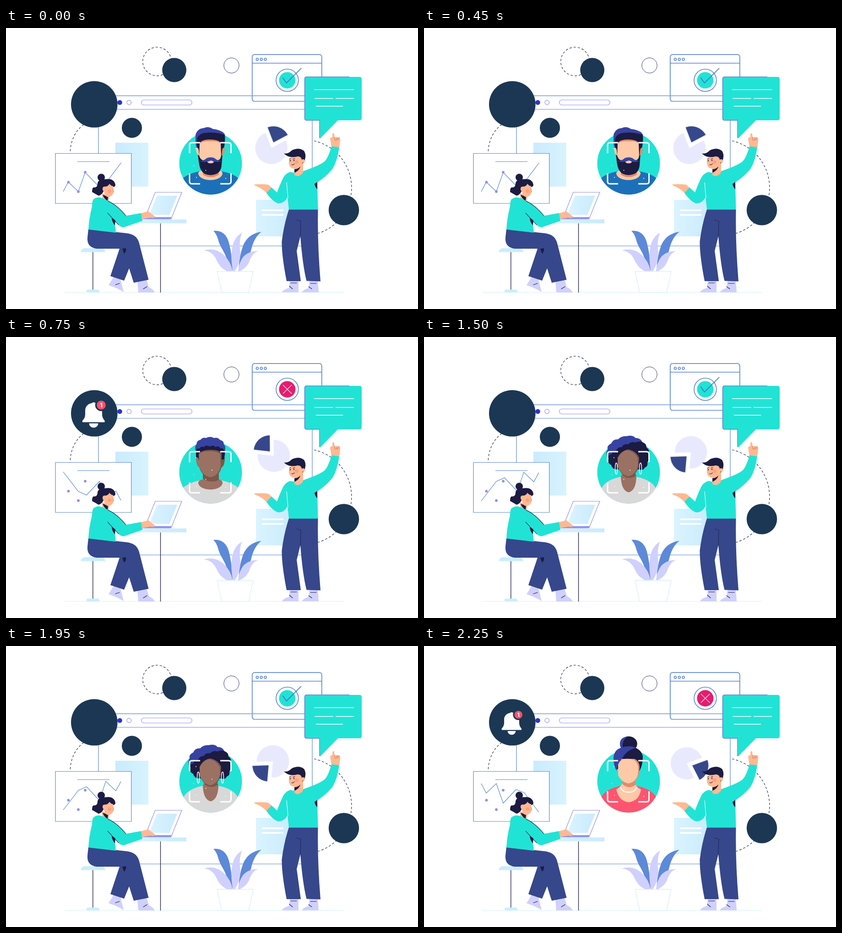
An HTML page that plays this animation: 900 by 615 pixels, repeating every 3 s.

```html
<!DOCTYPE html>
<html lang="en">
<head>
<meta charset="utf-8">
<title>Identity check</title>
<style>
html, body { margin: 0; width: 100%; height: 100%; overflow: hidden; background: #fff; }
svg { display: block; width: 900px; height: 615px; }
.line { fill: none; stroke: #5d87d8; stroke-width: 1.2; }
.dash { fill: none; stroke: #28305f; stroke-width: 1.2; stroke-dasharray: 5 4; }
.white { fill: none; stroke: #fff; }
.ink { fill: none; stroke: #1c1b42; stroke-width: 1.1; stroke-linecap: round; }
.navy { fill: #1c3754; }
.dark { fill: #1c1b42; }
.blue { fill: #36478b; }
.hair { fill: #3743a2; }
.teal { fill: #21e3d5; }
.skin { fill: #ffb992; }
.fair { fill: #fdc9a7; }
.brown { fill: #9b7163; }
.lilac { fill: #d0d0fe; }
.leaf { fill: #5d89d9; }

/* four scenes, 750 ms each, with hard cuts */
.scene { animation: scene 3s step-end infinite; }
.s1 { animation-delay: -2.25s; }
.s2 { animation-delay: -1.5s; }
.s3 { animation-delay: -.75s; }
.pass, .fail { animation: flip 1.5s step-end infinite; }
.fail { animation-delay: -.75s; }
.pie { animation: pie 3s step-end infinite; }
.bell { animation: bell 3s step-end infinite; }
@keyframes scene { 0% { visibility: visible; } 25%, 100% { visibility: hidden; } }
@keyframes flip { 0% { visibility: visible; } 50%, 100% { visibility: hidden; } }
@keyframes pie {
  0%, 100% { transform: translate(579.7px, 262.5px) rotate(-69.5deg); }
  25% { transform: translate(585px, 260px) rotate(-132deg); }
  50% { transform: translate(583px, 252.3px) rotate(136.5deg); }
  75% { transform: translate(574px, 256.8px) rotate(21.5deg); }
}
@keyframes bell {
  0%, 100% { transform: translate(191.5px, 161px); }
  50% { transform: translate(191.5px, 161px) scale(.89); }
}
</style>
</head>
<body>
<svg viewBox="0 0 900 615" xmlns="http://www.w3.org/2000/svg">
<defs>
  <linearGradient id="ice"><stop stop-color="#caeafe"/><stop offset="1" stop-color="#d8f3ff"/></linearGradient>
  <linearGradient id="ice2"><stop stop-color="#daf4ff"/><stop offset="1" stop-color="#caeafe"/></linearGradient>
  <clipPath id="disc"><path d="M370 180H524V296H515.5A68.5 68.5 0 0 1 378.5 296H370Z"/></clipPath>
</defs>

<!-- backdrop -->
<path class="line" style="stroke:#d3f0fa" d="M128 578.5H738"/>
<circle class="dash" cx="330" cy="73.3" r="31.3"/>
<circle class="navy" cx="367.6" cy="92" r="26.4"/>
<circle class="line" style="stroke:#343a78;stroke-width:1" cx="492.5" cy="82" r="16.6"/>
<path class="dash" d="M170 211Q141 233 140 275M673 247A105 105 0 0 1 680 450"/>
<circle class="navy" cx="738" cy="398.5" r="33.2"/>

<!-- main window -->
<path class="line" d="M202 148.3H669V477H202ZM202 178H669"/>
<circle cx="248.5" cy="163" r="5.3" fill="#2f32d0"/>
<g fill="none" stroke="#9594f4" stroke-width="1.2">
  <circle cx="268.8" cy="163" r="4.8"/>
  <rect x="295.6" y="157.5" width="110.6" height="11" rx="5.5"/>
</g>
<path fill="url(#ice)" d="M239 251H311V347H239Z"/>
<circle class="navy" cx="275" cy="218.5" r="22"/>
<path fill="url(#ice2)" d="M546 376H626V456H546Z"/>
<path class="white" stroke-width="3.6" d="M559 399H606M559 409H606"/>

<!-- alert -->
<circle class="navy" cx="192.8" cy="167" r="50.8"/>
<g class="fail"><g class="bell">
  <path fill="#fff" d="M-24.5 25.5V22Q-19 17 -18.5 9V0C-18.5 -10 -11 -15 -5 -16Q0 -20 5 -16C11 -15 18.5 -10 18.5 0V9Q19 17 24 22V25.500ZM-10 28H10A10 9.500 0 0 1 -10 28Z"/>
  <circle cx="16.5" cy="-12" r="11.5" fill="#ff5069" stroke="#1c3754" stroke-width="3.5"/>
  <text x="16.5" y="-7" text-anchor="middle" fill="#fff" font-family="Inter, Arial, sans-serif" font-weight="800" font-size="13.5">1</text>
</g></g>

<!-- pie -->
<g class="pie">
  <path id="rest" fill="#e9e9fe"/>
  <path id="cut" class="blue"/>
</g>

<!-- chart card -->
<path class="line" style="fill:#fff" d="M108 274.500H273.800V384H108Z"/>
<path class="line" d="M156 292.500H226"/>
<g class="line">
  <path class="scene s0" d="M125 358L136 337L158 358L173 316L201 345L219 338L251.500 295"/>
  <path class="scene s1" d="M125 295L158 338L176 346L204 316L218 358L240 337L251 357.500"/>
  <path class="scene s2" d="M125 359L158 316L176 308L204 338L218 296L240 317L251 296.500"/>
  <path class="scene s3" d="M125 301L136 322L158 301L173 344L201 314L219 321L251 364"/>
</g>
<g fill="#8f8ff2"><circle cx="136.4" cy="337.4" r="2.9"/><circle cx="158" cy="358" r="2.9"/><circle cx="173" cy="315.6" r="2.9"/></g>

<!-- portraits -->
<circle class="teal" cx="447" cy="296" r="68.5"/>
<g clip-path="url(#disc)">
  <g class="scene s0">
    <path fill="#1c70b9" d="M370 370L386 329Q397 319 421 314H473Q497 319 508 329L524 370Z"/>
    <path class="fair" d="M420 317Q421 313 432 311H463Q472 313 473 317C473 338 420 338 420 317Z"/>
    <path fill="#df8d6c" d="M430 305H465V321Q447 332 430 321Z"/>
    <path class="dark" d="M415 243Q415 228 432 226L472 228L478 234Q480 252 473 274L471 300Q470 314 460 319Q447 325 434 319Q423 313 421 292Z"/>
    <path class="hair" d="M414 252V234Q418 220 432 219Q442 214 452 221Q464 222 474 228L479 234Q460 228 442 229Q424 229 418 240L416 264Z"/>
    <path fill="#df8d6c" d="M423 252Q428 244 445 244Q463 244 469 251L468 270H424Z"/>
    <path class="fair" d="M423 253Q430 247 447 248Q464 247 469 253L470 279Q469 290 460 290H433Q424 289 422 279ZM415 263Q420 260 421 268L422 279Q415 277 415 263Z"/>
    <path fill="#df8d6c" d="M478 263Q473 260 472 268L471 279Q478 277 478 263Z"/>
    <path class="fair" d="M439 290Q447 287 455 290Q454 297 447 296Q440 297 439 290Z"/>
    <path class="hair" d="M423 291Q434 290 438 285Q447 281 456 285Q460 290 471 291Q458 296 447 290Q436 296 423 291Z"/>
  </g>
  <g class="scene s1">
    <path fill="#d8d8d8" d="M370 370L386 331Q397 320 422 314H472Q497 320 508 331L524 370Z"/>
    <path class="brown" d="M420 318Q421 313 432 311H463Q472 313 473 318C473 339 420 339 420 318Z"/>
    <path fill="#7b5649" d="M430 296H465V313Q447 321 430 310ZM478 263Q473 260 471 268L470 286Q478 283 478 263Z"/>
    <path class="dark" d="M416 270Q413 248 418 236Q428 228 447 228Q466 228 476 237Q481 250 476 268Z"/>
    <path class="hair" d="M414 249Q412 239 416 235Q417 226 425 225Q429 219 437 221Q446 216 454 221Q463 219 467 225Q476 227 476 235Q481 240 478 249Q472 241 469 244Q464 237 458 241Q452 235 445 240Q437 235 432 241Q426 238 423 244Q418 243 414 249Z"/>
    <path fill="#7b5649" d="M422 254Q431 246 447 247Q464 246 471 254V284Q466 306 447 309Q427 305 422 284Z"/>
    <path class="brown" d="M421 256Q430 249 445 250Q460 249 468 256L469 282Q465 303 447 307Q428 304 422 282ZM415 265Q420 261 421 269L422 285Q416 283 415 265Z"/>
  </g>
  <g class="scene s2">
    <path class="dark" d="M405 246Q397 256 403 266Q400 276 409 280Q411 290 423 290H471Q479 293 482 286Q490 283 488 274Q495 266 490 257Q494 246 486 242Q486 233 477 230Q470 222 458 224Q440 218 424 229Q409 234 405 246Z"/>
    <path class="hair" d="M400 264Q396 253 401 247Q399 237 409 233Q413 223 424 224Q431 216 443 217Q456 214 462 221Q473 221 477 230Q468 227 462 231Q452 228 446 235Q436 233 432 241Q423 240 420 249Q412 248 410 256Q404 257 400 264Z"/>
    <path fill="#d8d8d8" d="M370 380L386 335Q394 313 430 306H464Q500 313 508 335L524 380Z"/>
    <path class="brown" d="M430 306L434 295H460L464 306Q463 336 447 340Q431 336 430 306Z"/>
    <path fill="#7b5649" d="M434 294H461L463 304Q447 313 434 303ZM423 264Q430 249 446 246Q463 249 470 264L469 282Q464 304 447 307Q428 302 423 282Z"/>
    <path class="brown" d="M423 265Q430 252 441 248Q458 248 467 265V282Q463 301 446 305Q429 301 423 282Z"/>
    <g class="white" stroke-width="1.500"><ellipse cx="420" cy="288" rx="2.5" ry="12.5"/><ellipse cx="473" cy="288" rx="2.5" ry="12.5"/></g>
  </g>
  <g class="scene s3">
    <ellipse class="dark" cx="447" cy="214" rx="18.800" ry="16.200"/>
    <path class="hair" d="M445 198Q428 200 428 214Q428 224 435 227Q430 208 445 198Z"/>
    <path fill="#ff5470" d="M370 380L386 333Q395 313 430 306H464Q499 313 508 333L524 380Z"/>
    <path class="fair" d="M420 314Q431 308 433 300H461Q463 309 474 314Q470 339 447 342Q425 339 420 314Z"/>
    <path fill="#df8d6c" d="M433 296H462V304Q447 315 433 302Z"/>
    <path class="dark" d="M425 237Q437 221 457 221Q475 226 478 242Q478 260 471 273L421 269Z"/>
    <path class="hair" d="M421 273Q414 263 414 246Q414 224 440 220Q455 218 463 223Q442 228 433 246Q424 253 421 273Z"/>
    <path fill="#df8d6c" d="M430 247H460Q471 252 471 267L469 283Q463 299 447 301Z"/>
    <path class="fair" d="M424 260Q428 247 440 247Q453 246 461 251Q468 257 468 270L467 283Q462 298 446 301Q430 297 424 283Z"/>
    <path class="white" stroke-width="2.200" d="M429 309Q433 320 447 320Q461 320 465 309"/>
  </g>
</g>
<g fill="#fff">
  <circle cx="415" cy="264" r="1"/><circle cx="416" cy="327" r="1"/><circle cx="480" cy="329" r="1.1"/>
  <circle cx="436.5" cy="311.5" r="1"/><circle cx="450" cy="291.5" r="1"/><circle cx="410" cy="301" r=".7"/>
</g>
<path class="white" stroke-width="3" d="M401 274V256Q401 251 406 251H424M468 251H486Q491.500 251 491.500 256V274M491.500 318V336Q491.500 341 486 341H468M424 341H406Q401 341 401 336V318"/>

<!-- verdict window -->
<g class="line" style="stroke-width:1.700">
  <rect x="537.8" y="58.2" width="152" height="102.3" rx="5"/>
  <path d="M538 77H690"/>
  <circle cx="548.8" cy="68.5" r="2.5"/><circle cx="557.7" cy="68.5" r="2.5"/><circle cx="566.5" cy="68.5" r="2.5"/>
  <circle cx="614.4" cy="114.4" r="24.4" fill="#fff"/>
</g>
<g class="pass">
  <circle class="teal" cx="614.4" cy="114.4" r="18"/>
  <path class="line" style="stroke:#4673c6;stroke-width:1.700" d="M604.500 108.500L612.500 120.500L645 88"/>
</g>
<g class="fail">
  <circle cx="614.4" cy="114.4" r="18" fill="#e51d70"/>
  <path class="white" stroke-width="1.100" d="M605 105L624 124M624 105L605 124"/>
</g>

<!-- speech bubble -->
<path class="teal" d="M657 107H772Q777 107 777 112V197Q777 202 772 202H725L686 242V202H657Q653 202 653 198V111Q653 107 657 107Z"/>
<path class="line" style="stroke-width:1.600" d="M750 107H657Q652.500 107 652.500 111.500V197.500Q652.500 202 657 202H685V241"/>
<path class="white" stroke-width="1.600" d="M673 134.800H760M674 154.200H714.500M720 154.200H760M677 171.300H736"/>

<!-- plant -->
<path class="leaf" d="M453 444Q479 441 487 470Q494 497 495 531H490Q483 502 473 485Q466 474 463 462Q460 451 453 444ZM558 446Q529 450 518 476Q509 500 508 531Q528 510 535 488Q541 459 558 446Z"/>
<path class="lilac" d="M432 487Q456 479 476 497Q491 511 495 532H482Q466 524 459 506Q450 488 432 487ZM551 488Q530 488 518 501Q508 515 507 532H511Q528 524 533 507Q539 492 551 488Z"/>
<path class="lilac" d="M516 448Q499 456 494 481Q490 507 496 532H500Q512 515 512 491Q508 464 516 448Z"/>
<path fill="#fff" stroke="#c6eef6" d="M461 532.500H540L530 578.500H471Z"/>

<!-- presenter -->
<path class="lilac" d="M620 552H639V578.500H603Q606 572 618 569ZM663 552H681L683 578.500H646Q650 572 661 569Z"/>
<path class="ink" d="M622 558H635M619 565L626 571M665 559H678M661 566L668 571"/>
<path class="blue" d="M618 397H681.500Q680 470 687 554.500L656.500 553.500Q648 520 643 456L635 488L644 554H613Q602 498 602.500 467Q607 430 618 397Z"/>
<path class="ink" style="stroke-width:.8" d="M635 420L644 423L643 456"/>
<path class="skin" d="M542 342.500Q558 341 573 343L581 350L570 362Q559 350 544 345ZM711 260L708 243Q708 239 713 239L713 232Q715 228 717 232L718 239H728Q731 241 730 247Q729 254 728 262Z"/>
<path class="ink" style="stroke:#b65c4c;stroke-width:.7" d="M718 239V245Q721 247 723 244V240M723 244Q726 247 727 240"/>
<path class="teal" d="M622 315Q633 320 650 313Q685 301 696 292Q704 284 711 259L728 261Q724 290 714 307Q702 323 680 338L681.500 397.500H618L615 371Q607 384 595 384Q583 381 569 361L580 349L592 360Q599 341 606 327Q612 317 622 315Z"/>
<path class="white" stroke-width="1" d="M613 338L616 373"/>
<path class="dark" d="M674 341L680 337V353Q675 348 674 341Z"/>
<path class="skin" d="M621 283Q630 276 645 279L653 284Q655 294 649 296V316Q641 328 630 322V308Q620 308 618 297Q617 290 621 283Z"/>
<path class="dark" d="M607 274.500Q617 276 624 268Q640 260 651 269Q655 275 654 283Q653 291 648 297L646 288Q645 281 637 281Q618 286 607 274.500ZM630 309Q638 309 643 303Q641 312 630 317Z"/>
<circle class="skin" cx="649" cy="291" r="3.8"/>
<circle cx="635" cy="293.5" r="4" fill="#ff9f85"/>
<path class="ink" d="M619 287L622 286M627 287L631 286M624 299Q628 301 630 297"/>
<g class="dark"><circle cx="621" cy="290.5" r="1.2"/><circle cx="629" cy="290" r="1.2"/></g>

<!-- desk -->
<path fill="#c9eefe" d="M163 490.500Q165 482 172 482H210Q216 484 217 490.500ZM176 578.500V575Q176 572.500 179 572.500H201Q204 573 204 578.500Z"/>
<path class="ink" style="stroke-width:1.300" d="M189.800 491V572M337.500 428V578.500"/>
<path fill="url(#ice2)" d="M270 419H394V427.500H270Z"/>
<path fill="#fff" stroke="#8f90f5" stroke-width="1.200" d="M326 359.500H384L361 417H303Z"/>
<path fill="url(#ice2)" d="M330 367H374L357 409H313Z"/>
<path fill="#8f90f5" d="M300 414H362L360 418.500H297Z"/>

<!-- analyst -->
<path class="lilac" d="M236 543L250 550L257 578Q243 569 224 563ZM287 554L307 551L312 567Q323 573 325 579H289Z"/>
<path class="ink" d="M239 562L248 559M300 571L308 566"/>
<path class="blue" d="M180 440L262 449Q286 451 291 471L311.500 551L279 557.500L269 526L258 553L228 543L248 483H198Q176 480 178 458Z"/>
<path class="dark" d="M254 483L262 482Q263 489 258 494Z"/>
<path class="skin" d="M293 406L311 401L327 414Q322 417 315 415L298 418ZM210 362L226 366L224 379Q216 379 210 372Z"/>
<path class="teal" d="M191 375Q201 367 214 374Q238 382 262 411L295 405L298 422L258 436Q250 436 246 431L237 421L240 448L180 441Q181 418 188 390Q188 379 191 375Z"/>
<path class="ink" d="M223 379Q242 387 262 411M222 405L246 431"/>
<path class="dark" d="M231 415L239 421L238 432Q231 424 231 415ZM211 365L223 369L222 378Q214 374 211 365Z"/>
<path class="dark" d="M200 340Q201 331 217 331Q236 328 239 343Q239 349 231 348L216 347Q213 365 202 367Q192 361 188 359Q188 350 191 349Q200 350 200 340Z"/>
<circle class="dark" cx="208" cy="327" r="8"/>
<path class="skin" d="M215 347Q222 348 226 341Q230 346 234 346L235.500 358Q233 369 223 370Q216 369 214 358Q209 354 212 348Z"/>
<circle cx="226" cy="357" r="4" fill="#ff9f85"/>
<path class="ink" style="stroke:#d87d69;stroke-width:.8" d="M233 353L235.500 358L233 359"/>
</svg>
<script>
const R = 35.4, half = 41.5 * Math.PI / 180;
const x = R * Math.cos(half), y = R * Math.sin(half);
const sector = (dx, large) =>
  `M${dx} 0L${dx + x} ${large ? y : -y}A${R} ${R} 0 ${large} 1 ${dx + x} ${large ? -y : y}Z`;
document.getElementById('rest').setAttribute('d', sector(0, 1));
document.getElementById('cut').setAttribute('d', sector(12.8, 0));
</script>
</body>
</html>
```
